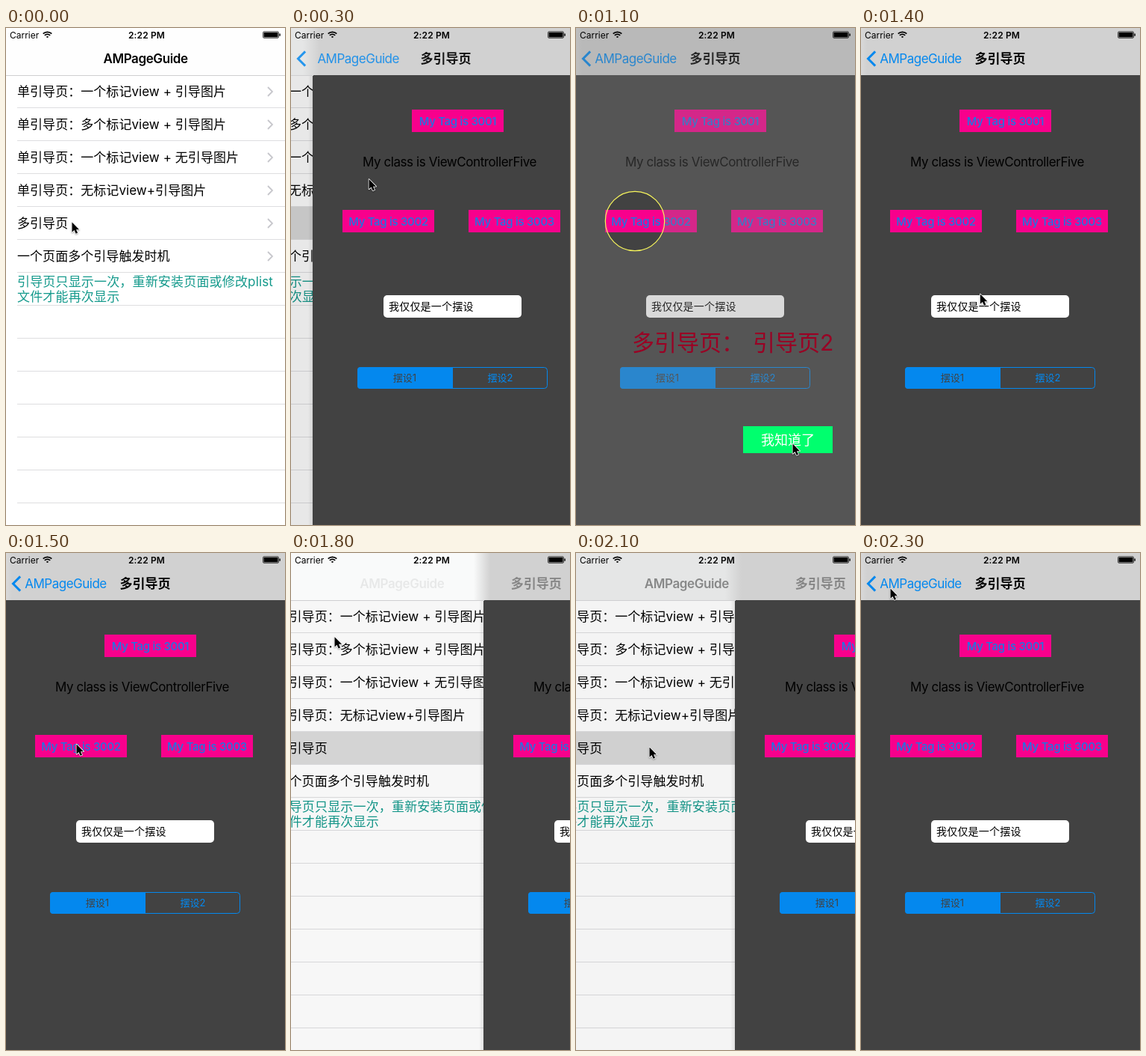
Write an HTML page with a canvas that moves like this. It is 374 by 664 pixels and loops after 2400 ms.

```html
<!DOCTYPE html>
<html lang="zh-CN">
<head>
<meta charset="utf-8">
<title>Page guide demo</title>
<style>
html, body { margin: 0; width: 100%; height: 100%; overflow: hidden; background: #fff; }
canvas { display: block; width: 374px; height: 664px; }
</style>
</head>
<body>
<canvas id="stage" width="374" height="664"></canvas>
<script>
const W = 374, H = 664, NAV = 63, LOOP = 2400, STEP = 100;
const c = document.getElementById('stage').getContext('2d');
const FONT = 'Inter, "Noto Sans CJK SC", "Noto Sans CJK", sans-serif';
const BLUE = '#0488ee', DARK = '#424242', PINK = '#f8008c';

// Times of the page transitions
const SLIDE = 250, PUSH = 157.5, POP = 1718.7, PRESS = 2000, PUSH2 = 2057.5;

const ROWS = [
  '单引导页：一个标记view + 引导图片',
  '单引导页：多个标记view + 引导图片',
  '单引导页：一个标记view + 无引导图片',
  '单引导页：无标记view+引导图片',
  '多引导页',
  '一个页面多个引导触发时机'
];

// Pointer stops: time, x, y
const STOPS = [
  [100, 88, 259], [500, 120, 144], [900, 290, 555], [1200, 290, 555], [1500, 94, 255],
  [1700, 38, 38], [2000, 98, 259], [2100, 98, 259], [2300, 39, 47]
];

const clamp = v => Math.min(1, Math.max(0, v));
const slide = ms => 1 - (1 - clamp(ms / SLIDE)) ** 3;

function pointerAt(t) {
  const i = STOPS.findIndex(s => s[0] >= t);
  const [t1, x1, y1] = STOPS[i], [t0, x0, y0] = STOPS[Math.max(0, i - 1)];
  const u = t1 > t0 ? (t - t0) / (t1 - t0) : 0;
  return [x0 + (x1 - x0) * u, y0 + (y1 - y0) * u];
}

// x: left edge of the page; k: bar titles, 1 on the list and 0 on the page
function stateAt(t) {
  const popping = t >= 1600 && t < PRESS;
  const m = slide(t - (popping ? POP : t < PRESS ? PUSH : PUSH2));
  const moved = m ** 1.2, k = popping ? moved : 1 - moved;
  return {
    k,
    popping,
    x: Math.round(W * (popping ? m : 1 - m)),
    title: k ** (popping ? 6 : 2),
    row: popping ? 1 - m ** 8 : +(t >= 100),
    guide: clamp(Math.min(t - 300, 1400 - t) / 200)
  };
}

function text(s, x, y, size, color, { align = 'left', weight = 400, gap = 0, alpha = 1 } = {}) {
  if (alpha <= 0) return;
  c.save();
  c.globalAlpha *= alpha;
  c.font = `${weight} ${size}px ${FONT}`;
  c.letterSpacing = gap + 'px';
  c.textAlign = align;
  c.fillStyle = color;
  c.fillText(s, x, y);
  c.restore();
}

function rect(x, y, w, h, color) {
  c.fillStyle = color;
  c.fillRect(x, y, w, h);
}

function round(x, y, w, h, r) {
  c.beginPath();
  c.roundRect(x, y, w, h, r);
}

function fade(x0, x1, from, to) {
  const g = c.createLinearGradient(x0, 0, x1, 0);
  g.addColorStop(0, from);
  g.addColorStop(1, to);
  return g;
}

// A chevron whose tip is at x, y; a negative size points left
function chevron(x, y, size, color, width) {
  const d = Math.abs(size);
  c.beginPath();
  c.moveTo(x - size, y - d);
  c.lineTo(x, y);
  c.lineTo(x - size, y + d);
  c.strokeStyle = color;
  c.lineWidth = width;
  c.stroke();
}

function drawList({ x, row }) {
  c.save();
  c.translate((x - W) * .3, 0);
  rect(0, 0, W, H, '#fff');
  c.globalAlpha = row;
  rect(0, 239, W, 43, '#d9d9d9');
  c.globalAlpha = 1;
  for (let y = 106; y < H; y += 44) rect(15, y, W, 1, '#dedee0');
  ROWS.forEach((s, i) => {
    const y = 85 + i * 44;
    text(s, 15, y + 6, 17, '#000', { gap: .05 });
    chevron(357, y, 6, '#c7c7cc', 1.8);
  });
  text('引导页只显示一次，重新安装页面或修改plist', 15, 345, 17, '#159a8c', { gap: .17 });
  text('文件才能再次显示', 15, 365, 17, '#159a8c', { gap: .17 });
  c.restore();
  rect(0, 0, W, H, `rgba(0,0,0,${.1 * (1 - x / W)})`);
}

function tag(n, x, y) {
  rect(x, y, 123, 30, PINK);
  text('My Tag is ' + n, x + 61.5, y + 20.5, 15, '#1a78e4', { align: 'center', weight: 500, gap: -.3 });
}

function drawPage({ x }) {
  if (x >= W) return;
  if (x > 0) rect(x - 7, 0, 7, H, fade(x - 7, x, 'rgba(0,0,0,0)', 'rgba(0,0,0,.1)'));
  c.save();
  c.translate(x, 0);
  rect(-1, 0, W + 1, H, DARK);
  tag(3001, 132, 109);
  tag(3002, 39, 243);
  tag(3003, 208, 243);
  text('My class is ViewControllerFive', 182.5, 184.5, 17, '#000', { align: 'center', gap: -.42 });

  round(94, 357, 185, 30, 5);
  c.fillStyle = '#fff';
  c.fill();
  text('我仅仅是一个摆设', 101, 377, 14, '#000', { gap: .2 });

  round(59, 453, 128, 29, [4, 0, 0, 4]);
  c.fillStyle = BLUE;
  c.fill();
  round(59.5, 453.5, 254, 28, 4);
  c.strokeStyle = BLUE;
  c.lineWidth = 1;
  c.stroke();
  text('摆设1', 122.5, 472, 13, DARK, { align: 'center' });
  text('摆设2', 250.5, 472, 13, BLUE, { align: 'center' });
  c.restore();
}

function drawNav({ x, k, popping, title }) {
  const light = x >= W ? '#fefefe' : popping ? '#f9fafa' : '#e5e6e6';
  rect(0, 0, W, NAV, fade(x - 14, x + 8, light, '#d1d1d1'));
  if (x >= W) rect(0, 0, W, NAV, light);
  if (x > 0) rect(0, NAV, x, 1, '#cfcfd1');

  const mid = 80 + 107 * k, back = clamp(1 - k * 1.6);
  c.globalAlpha = back;
  chevron(9.5, 41, -9.6, BLUE, 3);
  c.globalAlpha = 1;
  text('AMPageGuide', mid, 47, 17, BLUE, { align: 'center', gap: -.5, alpha: back });
  text('AMPageGuide', mid, 47, 17, '#000', { align: 'center', weight: 600, gap: -.41, alpha: title });
  text('多引导页', 186.5 + 221 * k, 47, 17, '#000', { align: 'center', weight: 600, alpha: 1 - k });
}

function drawGuide(t, alpha) {
  if (alpha <= 0) return;
  const n = t < 900 ? 1 : 2;
  const [x, y, base] = n === 1 ? [193.5, 124, 364] : [79, 258, 431];
  c.save();
  c.globalAlpha = alpha;
  c.beginPath();
  c.rect(0, 0, W, H);
  c.arc(x, y, 40, 0, Math.PI * 2);
  c.fillStyle = 'rgba(128,128,128,.3)';
  c.fill('evenodd');
  c.beginPath();
  c.arc(x, y, 39.7, 0, Math.PI * 2);
  c.strokeStyle = '#f8f65c';
  c.lineWidth = 1.2;
  c.stroke();
  text('多引导页：', 75, base, 30, '#9a0024');
  text('引导页' + n, 237, base, 30, '#9a0024');
  rect(224, 532, 120, 36, '#00ff6e');
  text('我知道了', 284, 556.5, 18, '#fff', { align: 'center' });
  c.restore();
}

function drawStatus() {
  text('Carrier', 5, 13.5, 12, '#000');
  text('2:22 PM', 188.5, 13.5, 12, '#000', { align: 'center', weight: 600, gap: .15 });
  c.strokeStyle = c.fillStyle = '#000';
  c.lineWidth = 1.7;
  for (const r of [1.5, 5.2, 8.2]) {
    c.beginPath();
    c.arc(55.5, 13.5, r, -Math.PI * .75, -Math.PI * .25);
    c.stroke();
  }
  round(344.5, 4.8, 21, 8.6, 1.5);
  c.lineWidth = .7;
  c.stroke();
  rect(345.5, 5.8, 19, 6.6, '#000');
  rect(366.4, 7.5, 1.4, 3.2, '#000');
}

function drawPointer(t) {
  const [x, y] = pointerAt(t);
  c.save();
  c.translate(x + .5, y + .5);
  c.scale(.92, .92);
  const arrow = new Path2D('M0 0V14.5L3.3 11.5 5.6 16.6 8.2 15.5 6 10.5H10.4Z');
  c.lineJoin = 'round';
  c.lineWidth = 1.7;
  c.strokeStyle = '#fff';
  c.shadowColor = 'rgba(0,0,0,.35)';
  c.shadowBlur = 2;
  c.shadowOffsetY = 1;
  c.stroke(arrow);
  c.shadowColor = 'transparent';
  c.fillStyle = '#000';
  c.fill(arrow);
  c.restore();
}

function draw(t) {
  const s = stateAt(t);
  drawList(s);
  drawPage(s);
  drawNav(s);
  drawGuide(t, s.guide);
  drawStatus();
  drawPointer(t);
}

const start = performance.now();
function tick() {
  const t = (performance.now() - start) % LOOP;
  draw(Math.floor(t / STEP) * STEP);
  requestAnimationFrame(tick);
}
tick();
</script>
</body>
</html>
```
